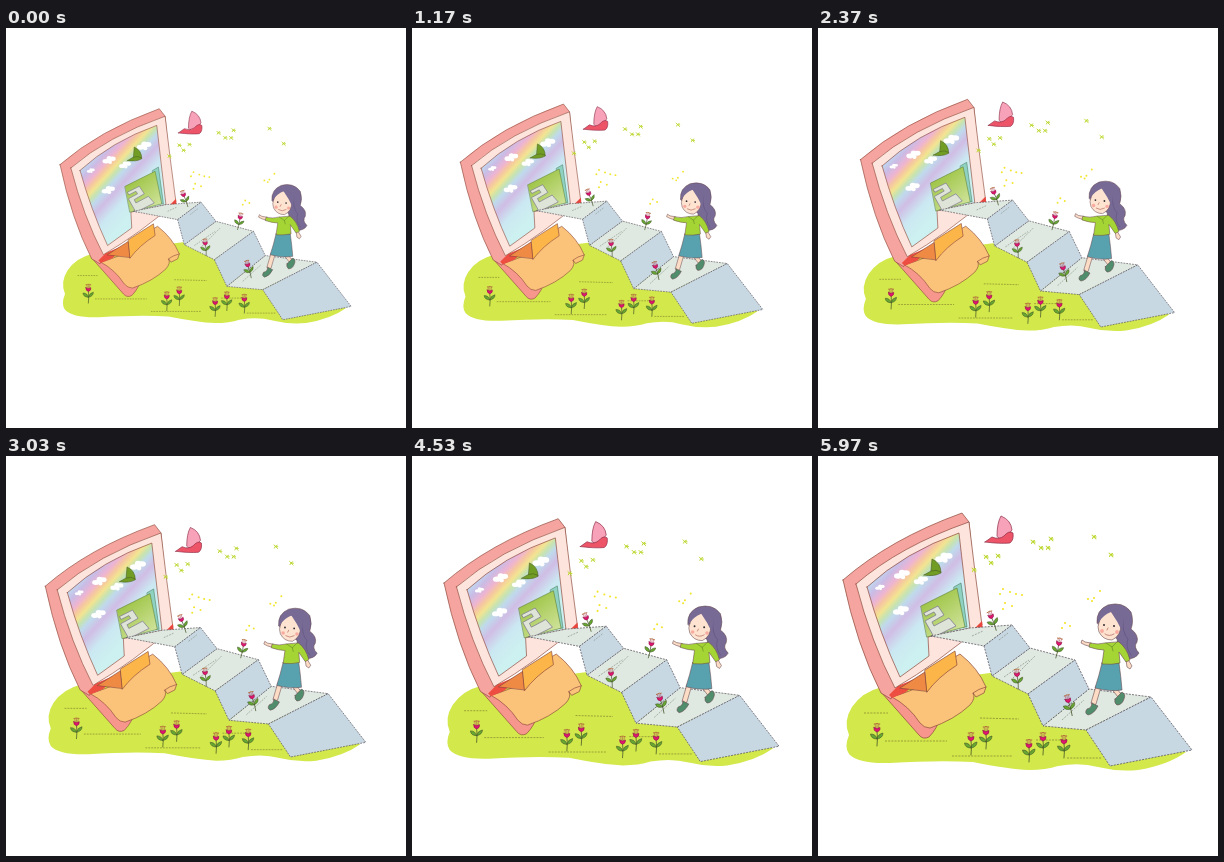
Write an HTML page that moves like this. It is 400 px wide and 400 px high and loops after 6.01 s.

```html
<!DOCTYPE html>
<html lang="en">
<head>
<meta charset="utf-8">
<title>Storybook stairs</title>
<style>
html,body{margin:0;width:100%;height:100%;overflow:hidden;background:#fff}
svg{display:block;width:100vw;height:100vh}
.dash{stroke-dasharray:2 1.2;stroke-linecap:butt;fill:none}
</style>
</head>
<body>
<svg viewBox="0 0 400 400">
<defs>
  <linearGradient id="sky" gradientUnits="userSpaceOnUse" x1="92" y1="84.5" x2="151" y2="138.6">
    <stop offset="0" stop-color="#bfd8ef"/><stop offset=".1" stop-color="#cabbe5"/>
    <stop offset=".2" stop-color="#eeb4d2"/><stop offset=".27" stop-color="#f6c79f"/>
    <stop offset=".34" stop-color="#f3e491"/><stop offset=".41" stop-color="#c6e3b2"/>
    <stop offset=".48" stop-color="#bfdaec"/><stop offset=".6" stop-color="#d0bde5"/>
    <stop offset=".78" stop-color="#cbe8f2"/><stop offset="1" stop-color="#cdf0f0"/>
  </linearGradient>
  <linearGradient id="door" x1="0" y1="0" x2=".7" y2="1">
    <stop offset="0" stop-color="#8fbb2c"/><stop offset="1" stop-color="#cfe39a"/>
  </linearGradient>
  <g id="cloud" fill="#fff">
    <ellipse cx="-4" cy="2" rx="4" ry="2.7"/><circle cy="-1" r="3.2"/>
    <ellipse cx="4" cy="-1" rx="3.8" ry="2.7"/><circle cx="1" cy="3" r="2.3"/>
  </g>
  <g id="flower" stroke="#46562a" stroke-width=".6">
    <path d="M0 2Q1 9 0 17" fill="none" stroke-width=".8"/>
    <path d="M0 10Q-6 10-6.5 5Q-1 5 0 10Q1 5 6 4Q6 9 0 10" fill="#66a832"/>
    <path d="M-3-1.5L0-.5L3-1.5Q3.5 2 0 3Q-3.5 2-3-1.5Z" fill="#e0156f" stroke="#8a1748"/>
    <path d="M-1.5-1.5L-2-5M0-1V-5M1.5-1.5L2-5" stroke="#a5324e" stroke-width=".5"/>
    <path d="M-2.8-5H-1.4M-.7-5.5H.7M1.4-5H2.8" stroke="#b06a38" stroke-width=".9"/>
  </g>
  <path id="spark" d="M-2-2L2 2M-1.5 1.5L-.5-.5L1.5-1.5M0 0H2.2" fill="none" stroke="#bcd62c"/>
</defs>
<g id="scene" stroke-linejoin="round" stroke-linecap="round">
  <path fill="#d3e84a" d="M64 231Q44 236 34 251Q25 265 31 279Q26 291 31 298Q40 308 72 307Q120 304 155 306Q190 313 211 314Q228 314 240 310Q262 306 280 311Q300 316 320 314Q350 309 368 296L290 262L200 223L172 217Z"/>
  <path class="dash" stroke="#8a8b32" stroke-width=".8" d="M46 257H70M67 285H129M162 262L201 263M134 300H194M249 302H284M218 284H250"/>

  <g stroke="#8c4a3c" stroke-width=".7">
    <path fill="#f7968c" d="M63 236L101 279Q105 284 111 281Q119 273 123 260L82 235Z"/>
    <path fill="#fbc27a" d="M74 241Q94 235 106 228Q118 210 142 198Q160 212 168 231L166 237L158 241L155 237Q158 242 152 249Q136 264 112 272Q106 272 102 267Q91 250 74 241Z"/>
    <path fill="none" d="M168 231Q160 233 155 237"/>
    <path fill="#f6a49f" d="M25 124Q72 83 144 57L151 66L156 120L75 238L73 243L63 237Q39 190 25 124Z"/>
    <path fill="#ee4d42" d="M71 239L80 230L108 218L88 236L74 242Z" stroke="none"/>
    <path fill="#ef8a45" d="M82 232L107 216L109 235Z"/>
    <path fill="#fbb548" d="M107 214L137 195L139 209Q120 221 109 236Z"/>
    <path fill="#fde4dc" d="M38 128Q82 90 151 66Q157 118 164 169Q120 207 77 232Q53 186 38 128Z"/>
    <path fill="#e9473e" d="M157 172L164 165L165 175Z" stroke="none"/>
    <path fill="url(#sky)" d="M49 131Q87 96 141 77Q146 121 152 172L110 181L111 200L82 221Q62 178 49 131Z"/>
  </g>
  <use href="#cloud" transform="translate(62 131) scale(.6)"/>
  <use href="#cloud" x="84" y="118"/>
  <use href="#cloud" x="83" y="154"/>
  <use href="#cloud" transform="translate(103 124) scale(.9)"/>
  <use href="#cloud" transform="translate(126 101) scale(1.1)"/>
  <path fill="#719d25" stroke="#4b5c20" stroke-width=".6" d="M106 119L113 115L114 103Q123 107 123 117Q116 121 106 119ZM113 115Q118 113 123 116"/>

  <path fill="#8fd2c2" stroke="#497a62" stroke-width=".6" d="M136 131L143 127L149 171H140Z"/>
  <path fill="url(#door)" stroke="#5b7b34" stroke-width=".6" d="M103 150L139 132L147 171L109 181Z"/>
  <path fill="#dfe4d8" stroke="#817a92" stroke-width=".8" d="M106 157L120 150L126 159L114 166L116 170L131 162L138 170L116 181L107 165L118 159L116 156L108 160Z"/>

  <g class="dash" stroke="#5f5a62" stroke-width=".8">
    <g fill="#e0e9e1">
      <path d="M113 180L152 172L194 169L166 190Z"/>
      <path d="M174 220L212 192L257 204L210 238Z"/>
      <path d="M225 270L271 233L333 241L268 274Z"/>
    </g>
    <g fill="#c8d8e3">
      <path d="M166 190L194 169L212 192L174 220Z"/>
      <path d="M210 238L257 204L271 233L225 270Z"/>
      <path d="M268 274L333 241L374 294L292 310Z"/>
    </g>
    <path stroke="#8f9a8f" d="M186 221L211 204M195 222L217 200M244 264L266 244M154 180L165 175M181 184L190 177"/>
  </g>

  <use href="#flower" x="59" y="273"/>
  <use href="#flower" x="153" y="282"/>
  <use href="#flower" x="168" y="276"/>
  <use href="#flower" x="211" y="289"/>
  <use href="#flower" x="225" y="282"/>
  <use href="#flower" x="246" y="285"/>
  <use href="#flower" transform="translate(173 160) rotate(-20) scale(.9)"/>
  <use href="#flower" transform="translate(241 187) rotate(12) scale(.9)"/>
  <use href="#flower" transform="translate(199 218) rotate(-5) scale(.9)"/>
  <use href="#flower" transform="translate(250 244) rotate(-15) scale(.95)"/>

  <g stroke="#8c2b46" stroke-width=".7">
    <path fill="#f7a2b8" d="M179 80Q179 67 183 60Q193 64 194 74Q190 80 184 84Z"/>
    <path fill="#ee5468" d="M167 86L174 81Q181 84 186 80Q191 74 195 77Q196 84 192 87Q182 88 167 86Z"/>
  </g>
  <g id="sparks"></g>
  <g id="dots" fill="#f3e52c"></g>

  <g stroke="#6a4a50" stroke-width=".6">
    <path fill="#776a95" d="M279 167Q278 154 290 149Q305 145 313 156Q316 165 313 173Q321 179 319 186Q315 191 321 197Q318 203 308 203Q300 194 299 183Z"/>
    <path fill="none" stroke="#5f507f" d="M305 163Q304 177 310 183Q307 191 313 199"/>
    <path fill="#fcdcc5" d="M283 231L278 248L275 250L273 247L278 230ZM292 231L300 241L303 238L296 229Z"/>
    <path fill="#4f8d6c" d="M274 247L280 250Q276 258 270 259Q266 257 269 253Q274 252 274 247ZM297 243L304 236Q308 238 306 243Q304 249 299 249Q296 247 297 243Z"/>
    <path fill="#fcdcc5" d="M273 187L267 186L264 184L263 187L267 189L272 190.500ZM308 204L309 211L312 213L314 210L311 205Z"/>
    <path fill="#57a2ae" d="M284 207H301Q303 221 304 234Q292 236 277 232Q281 220 284 207Z"/>
    <path fill="#a5d534" d="M287 187Q280 189 272 187L271 191Q280 194 286 194L284 208Q294 209 302 207L301 196L308 206L312 204Q309 192 301 186Z"/>
    <path fill="#fde3d0" d="M281 166Q284 157 292 155Q301 159 303 168Q303 180 294 184Q285 184 281 176Q279 171 281 166Z"/>
    <path fill="#776a95" stroke="none" d="M280 167Q281 154 294 151L306 162L304 175Q300 166 293 156Q285 159 280 167Z"/>
    <path fill="none" stroke="#a34b45" d="M287 178Q291 181 296 178M290 172l-1 2"/>
    <path fill="none" stroke="#5e8025" d="M288 187L294 191L299 186M294 191L295 195"/>
    <g stroke="none">
      <g fill="#f9aaa0"><circle cx="284" cy="175" r="1.9"/><circle cx="299" cy="176" r="1.9"/></g>
      <g fill="#332b35"><circle cx="286" cy="169" r="1"/><circle cx="296" cy="170" r="1"/></g>
    </g>
  </g>
</g>
</svg>
<script>
const byId = id => document.getElementById(id);
const sparks = [[168,101],[180,100],[173,107],[156,114],[215,86],[223,92],[230,92],[233,83],[276,81],[293,99]];
const dots = [[185,133],[182,138],[192,136],[198,138],[204,139],[187,147],[194,150],[185,153],
  [270,143],[274,145],[276,142],[282,135],[247,167],[252,170],[244,172]];
byId('sparks').innerHTML = sparks.map(([x, y]) => `<use href="#spark" x="${x}" y="${y}"/>`).join('');
byId('dots').innerHTML = dots.map(([x, y]) => `<circle cx="${x}" cy="${y}" r="1.1"/>`).join('');

const LOOP = 6010, FULL = 1.1987; // the scene is drawn at its largest size
const scene = byId('scene');
const start = performance.now();
function draw() {
  const t = (performance.now() - start) % LOOP;
  const zoom = (1 + .2 * t / LOOP) / FULL;
  scene.setAttribute('transform', `translate(200 200) scale(${zoom}) translate(-200 -200)`);
  requestAnimationFrame(draw);
}
draw();
</script>
</body>
</html>
```
